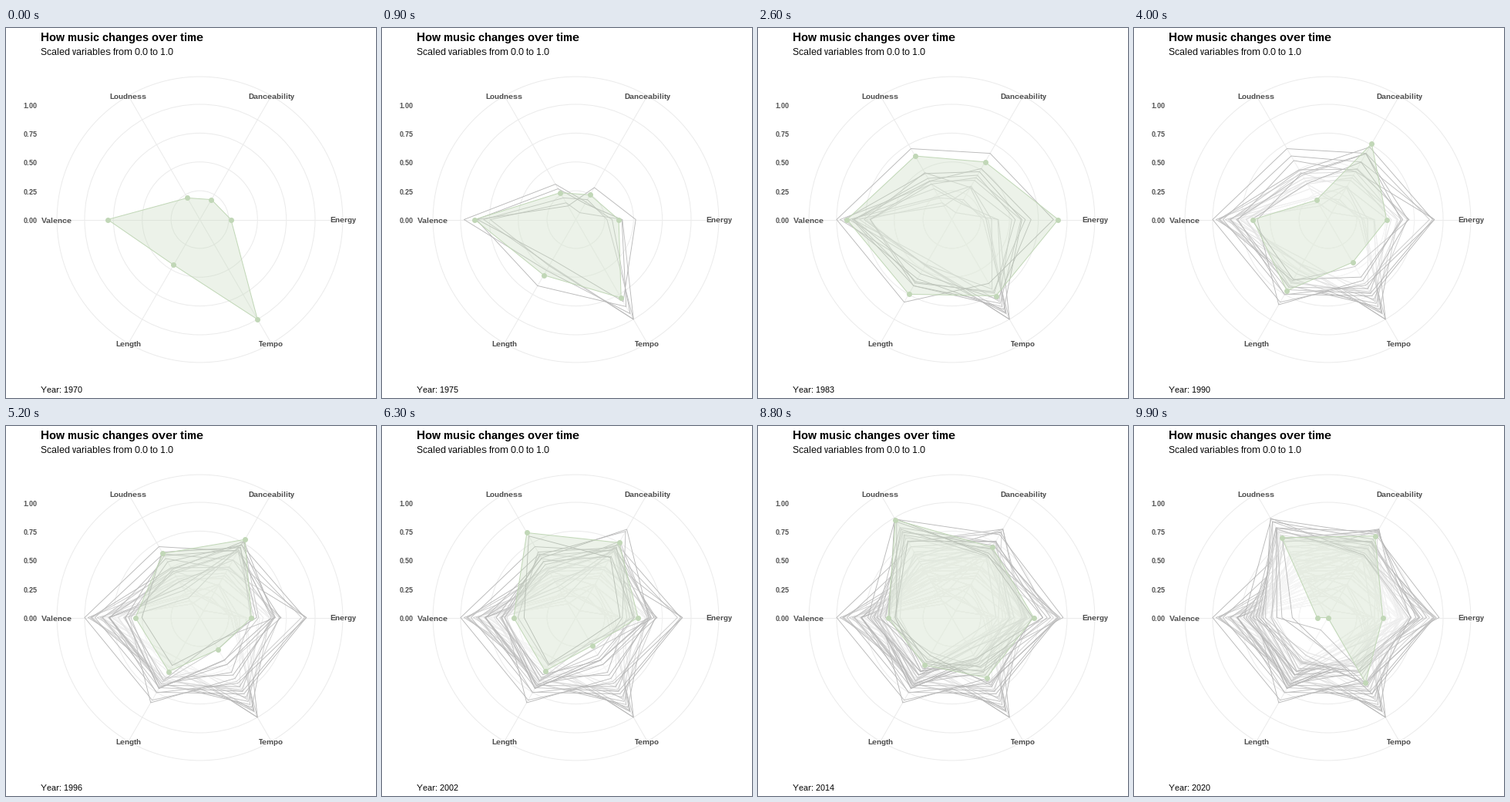
These frames come from a looping animation (480 by 480 pixels, 10000 ms). A matplotlib script:

```python
import numpy as np
import matplotlib.pyplot as plt
from matplotlib.animation import FuncAnimation
from matplotlib.patches import Circle, Polygon

plt.rcParams.update({"font.family": "Liberation Sans",
                     "text.hinting": "native", "text.hinting_factor": 1})

SIZE, FRAMES, INTERVAL = 480, 100, 100
FIRST, LAST = 1970, 2020
CX, CY, UNIT, RIM = 251.5, 248.5, 149.5, 185.4
GREEN, GREY, GRID, INK = "#C1D7B7", "#B8B8B8", "#EBEBEB", "#4D4D4D"
NAMES = ["Danceability", "Energy", "Tempo", "Length", "Valence", "Loudness"]
ANGLES = np.radians(30 + 60 * np.arange(6))
SPREAD = .16

# trend of the six variables, in the order of NAMES
TREND = {
    1970: (.20, .27, 1.0, .455, .80, .217),
    1979: (.444, .55, .737, .624, .853, .413),
    1983: (.577, .923, .765, .748, .91, .637),
    1990: (.76, .51, .429, .712, .65, .196),
    2002: (.75, .54, .282, .535, .54, .85),
    2009: (.723, .923, .543, .46, .623, .862),
    2016: (.75, .80, .55, .45, .60, .90),
    2020: (.818, .477, .652, .0, .093, .80),
}

YEARS = np.arange(FIRST, LAST + 1)
KEYS = np.round((YEARS - FIRST) * (FRAMES - 1) / (LAST - FIRST))


def blend(x, xs, rows):
    return np.array([np.interp(x, xs, col) for col in np.transpose(rows)]).T


def yearly_values():
    """Trend plus seeded scatter between its key years."""
    keys = list(TREND)
    noise = np.random.default_rng(7).uniform(-SPREAD, SPREAD, (len(YEARS), 6))
    noise[np.isin(YEARS, keys)] = 0
    return np.clip(blend(YEARS, keys, list(TREND.values())) + noise, 0, 1)


def polar(radius):
    return np.column_stack([CX + radius * np.sin(ANGLES),
                            CY - radius * np.cos(ANGLES)])


VALUES = yearly_values()

# at 72 dpi one point is one pixel
fig = plt.figure(figsize=(SIZE / 72, SIZE / 72), dpi=72, facecolor="white")
ax = fig.add_axes([0, 0, 1, 1])
ax.set(xlim=(0, SIZE), ylim=(SIZE, 0))
ax.axis("off")


def label(x, y, text, size, color="black", **kw):
    return ax.text(x, y, text, fontsize=size, color=color, va="baseline",
                   zorder=9, **kw)


def shape(radius, **kw):
    return ax.add_patch(Polygon(polar(radius), joinstyle="round", **kw))


# grid
rim = polar(np.full(6, RIM))
for r in [UNIT * k / 4 for k in range(1, 5)] + [RIM]:
    ax.add_patch(Circle((CX, CY), r, fill=False, ec=GRID, lw=1, zorder=1))
for x, y in rim:
    ax.plot([CX, x], [CY, y], color=GRID, lw=1, zorder=1)

# text
label(45, 17, "How music changes over time", 15, weight="bold")
label(45, 35, "Scaled variables from 0.0 to 1.0", 12)
year_text = label(45, 473, "", 11)
for k in range(5):
    label(40.5, 253 - k * UNIT / 4, f"{k / 4:.2f}", 9, INK,
          weight="bold", ha="right")
for name, (x, y) in zip(NAMES, rim):
    label(x, y + 4, name, 10, INK, weight="bold", ha="center")

# trail of past years, each with a faint white wash
trail = [shape(row * UNIT, fc=(1, 1, 1, .1), ec=GREY, lw=.9, zorder=2,
               visible=False) for row in VALUES]

fill = shape(VALUES[0] * UNIT, fc=GREEN, alpha=.3, lw=0, zorder=3)
edge = shape(VALUES[0] * UNIT, fill=False, ec=GREEN, lw=1, zorder=4)
dots, = ax.plot([], [], "o", color=GREEN, ms=7, mew=0, zorder=5)


def update(i):
    pts = polar(blend(i, KEYS, VALUES) * UNIT)
    fill.set_xy(pts)
    edge.set_xy(pts)
    dots.set_data(pts[:, 0], pts[:, 1])
    for key, patch in zip(KEYS, trail):
        patch.set_visible(bool(key < i))
    year = FIRST + round(i * (LAST - FIRST) / (FRAMES - 1))
    year_text.set_text(f"Year: {year}")
    return [fill, edge, dots, year_text, *trail]


anim = FuncAnimation(fig, update, frames=FRAMES, interval=INTERVAL,
                     repeat=True, repeat_delay=0, blit=False)
plt.show()
```
